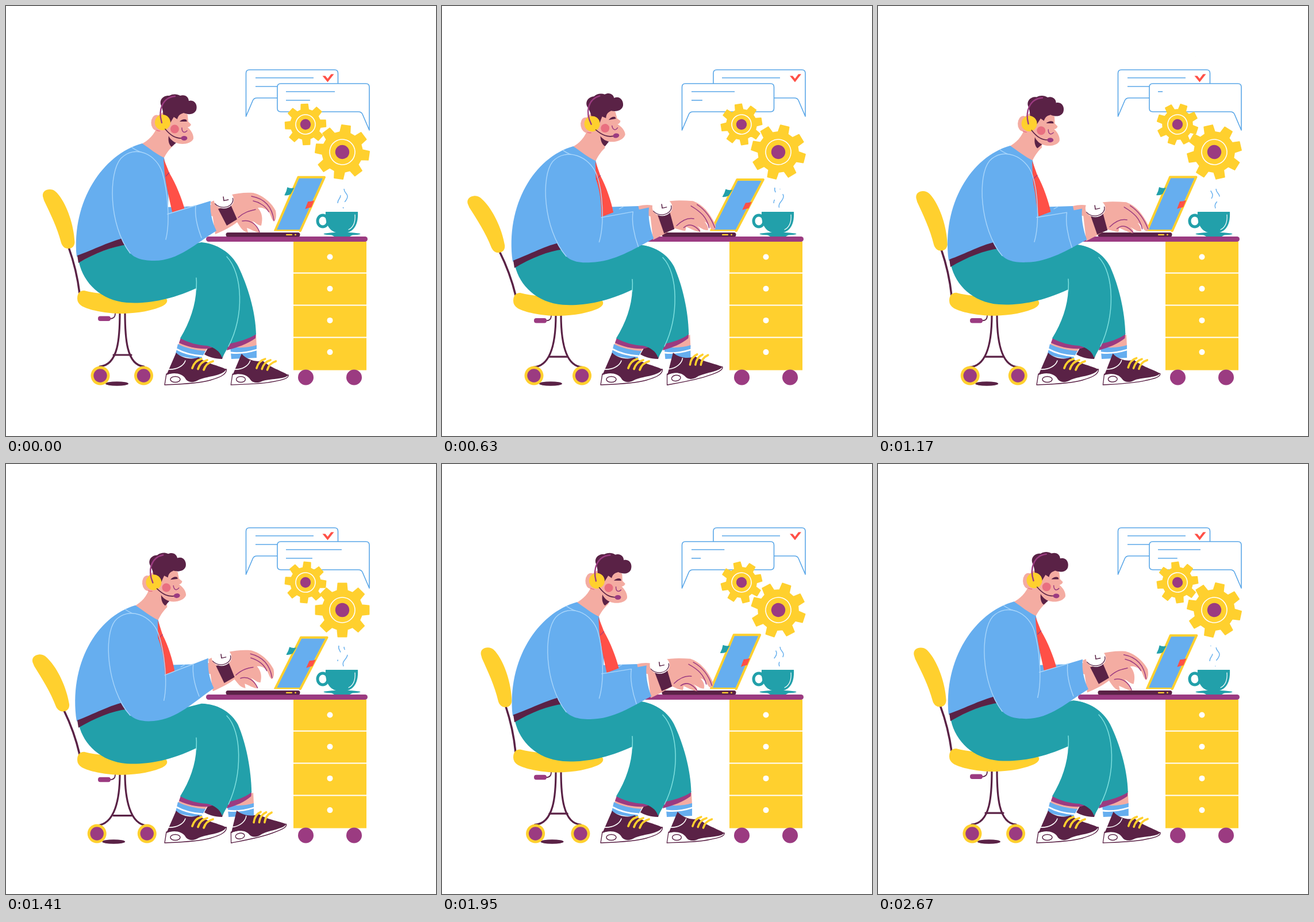
These frames come from a looping animation (748x748 px, 2.7 s). An HTML page with a canvas:

```html
<!DOCTYPE html>
<html lang="en">
<head>
<meta charset="utf-8">
<title>Office worker</title>
<style>
html, body { margin: 0; width: 100%; height: 100%; overflow: hidden; background: #fff; }
canvas { display: block; width: 748px; height: 748px; }
</style>
</head>
<body>
<canvas id="stage" width="748" height="748"></canvas>
<script>
const ctx = document.getElementById('stage').getContext('2d');
const LOOP = 2700, CYCLE = 900, STEP = 30;
const SKIN = '#f4aca2', DARK = '#5a2246', PURPLE = '#9b3b81', TEAL = '#22a0aa',
  YELLOW = '#ffd02e', RED = '#ff5047', BLUE = '#66aeef', PALE = '#a9d6fb', WHITE = '#fff';

const clamp = (v, lo = 0, hi = 1) => Math.min(hi, Math.max(lo, v));
const lerp = (a, b, k) => a + (b - a) * k;
const wave = (t, period) => (1 - Math.cos(2 * Math.PI * t / period)) / 2;
const backOut = x => 1 + 3 * (x - 1) ** 3 + 2 * (x - 1) ** 2;

// Smooth periodic curve through values at fixed phases of the cycle.
const PHASES = [0, 270, 450, 630, 750];
function cyclic(values, t) {
  const n = PHASES.length, p = t % CYCLE;
  const time = i => PHASES[(i + n) % n] + CYCLE * Math.floor(i / n);
  const val = i => values[(i + n) % n];
  const slope = i => (val(i + 1) - val(i - 1)) / (time(i + 1) - time(i - 1));
  let i = n - 1;
  while (PHASES[i] > p) i--;
  const d = time(i + 1) - time(i), x = (p - time(i)) / d;
  const s = x * x * (3 - 2 * x);
  return lerp(val(i), val(i + 1), s) +
    d * (slope(i) * x * (1 - x) ** 2 - slope(i + 1) * x * x * (1 - x));
}

const PAIR = /(-?[\d.]+) (-?[\d.]+)/g;
const warp = (d, fn) => d.replace(PAIR, (_, x, y) => fn(+x, +y).join(' '));
function morph(a, b, k) {
  const nums = b.match(/-?[\d.]+/g);
  let i = 0;
  return a.replace(/-?[\d.]+/g, v => lerp(+v, +nums[i++], k));
}
function fill(color, d) { ctx.fillStyle = color; ctx.fill(new Path2D(d)); }
function line(color, width, d) {
  ctx.strokeStyle = color; ctx.lineWidth = width; ctx.stroke(new Path2D(d));
}
function oval(color, x, y, rx, ry = rx) {
  ctx.fillStyle = color; ctx.beginPath();
  ctx.ellipse(x, y, rx, ry, 0, 0, 7); ctx.fill();
}
function ring(color, width, x, y, rx, ry = rx, from = 0, to = 2 * Math.PI) {
  ctx.strokeStyle = color; ctx.lineWidth = width; ctx.beginPath();
  ctx.ellipse(x, y, rx, ry, 0, from, to); ctx.stroke();
}
function pill(color, x, y, w, h, r) {
  ctx.fillStyle = color; ctx.beginPath(); ctx.roundRect(x, y, w, h, r); ctx.fill();
}
function group(draw, x, y, angle = 0, px = 0, py = 0, sx = 1, sy = sx) {
  ctx.save();
  ctx.translate(x + px, y + py);
  ctx.rotate(angle * Math.PI / 180);
  ctx.scale(sx, sy);
  ctx.translate(-px, -py);
  draw();
  ctx.restore();
}

// Messages: arrival, start of each typed line, start of the check mark.
const MESSAGES = [
  { at: 297, type: 427, type2: 560, check: 890, left: true },
  { at: 942, type: 1148, type2: 1240, check: 1575, left: false },
  { at: 1615, type: 1795, type2: 1890, check: 2220, left: true },
  { at: 2250, type: 2470, type2: 2545, check: 2900, left: false }
];
function message(k) {
  const n = MESSAGES.length, m = MESSAGES[(k + n) % n];
  return { ...m, shift: LOOP * Math.floor(k / n) };
}
const scrolled = (k, t) => {
  const m = message(k);
  return wave(clamp((t - m.at - m.shift + 115) / 220), 2);
};
function bubble(k, t) {
  const m = message(k), now = t - m.shift, next = message(k + 2);
  const age = now - m.at + 53, gone = clamp((t - next.at - next.shift - 2) / 250);
  if (age <= 0 || gone >= 1) return;
  const size = Math.max(0, backOut(clamp(age / 160))) * (1 - gone) ** 2;
  const top = 159 - 24 * (scrolled(k, t) + scrolled(k + 1, t) + scrolled(k + 2, t));
  const typed = (start, rate, max) => clamp((now - start) * rate, 0, max);
  group(() => {
    const outline = 'M-80 81 L-80 6 Q-80 0 -74 0 L74 0 Q80 0 80 6 L80 43 Q80 49 74 49 L-61 49 Q-66 49 -68 53 Z';
    const d = m.left ? outline : warp(outline, (x, y) => [-x, y]);
    fill(WHITE, d);
    ctx.lineCap = 'butt';
    line('#5aa7e8', 1.6, d);
    const x = m.left ? -63.5 : -65;
    const first = typed(m.type, .37, 101), second = typed(m.type2, .27, 68);
    if (first) line('#5aa7e8', 1.6, `M${x} 14 h${first}`);
    if (second) line('#5aa7e8', 1.6, `M${x} 29 h${second}`);
    const pop = clamp((now - m.check) / 100);
    if (pop) group(() => fill(RED, 'M-10 -4 L-5 -4 L-1 1 L5 -7 L10 -7 L-1 7 Z'), 63, 14.5, 0, 0, 0, pop);
  }, m.left ? 497.5 : 552, top, 0, 0, 0, size);
}

function gear(x, y, outer, root, hub, core, angle) {
  group(() => {
    ctx.fillStyle = YELLOW; ctx.strokeStyle = YELLOW;
    ctx.lineWidth = 2; ctx.lineJoin = 'round'; ctx.beginPath();
    for (let i = 0; i < 8; i++) {
      for (const [r, a] of [[root, -.25], [outer, -.16], [outer, .16], [root, .25]]) {
        const q = i * Math.PI / 4 + a;
        ctx.lineTo(r * Math.cos(q), r * Math.sin(q));
      }
    }
    ctx.closePath(); ctx.fill(); ctx.stroke();
    ring(WHITE, 1.6, 0, 0, hub);
    oval(PURPLE, 0, 0, core);
  }, x, y, angle);
}

function desk() {
  pill(PURPLE, 348, 401, 281, 9, 4.5);
  ctx.fillStyle = YELLOW; ctx.fillRect(500, 410, 127, 223.5);
  for (let i = 0; i < 4; i++) {
    if (i) { ctx.fillStyle = WHITE; ctx.fillRect(500, 407.5 + i * 56, 127, 2); }
    oval(WHITE, 563.5, 436.5 + i * 55.2, 5);
  }
  oval(PURPLE, 521.5, 646, 13.5);
  oval(PURPLE, 605.5, 646, 13.5);
}

function cup(t) {
  oval(TEAL, 584.5, 396.5, 32, 2.6);
  fill(TEAL, 'M566 398 L603 398 L598 401 L571 401 Z');
  ring(TEAL, 5, 551, 374, 9, 10);
  fill(TEAL, 'M556 358 L612 358 C613 376 608 390 594 394 L574 394 C560 390 555 376 556 358 Z');
  line(WHITE, 1.2, 'M607 363 C608 376 604 385 596 389');
  ctx.save();
  ctx.lineCap = 'butt';
  ctx.setLineDash([26, 10]);
  ctx.lineDashOffset = -(12 + 36 * t / CYCLE);
  line('#69b1ee', 1.5, 'M587 352 C583 342 594 340 594 331 C594 326 588 325 588 318');
  ctx.setLineDash([15, 14]);
  ctx.lineDashOffset = -29 * t / CYCLE;
  line('#69b1ee', 1.5, 'M577 343 C577 335 582 336 582 329 C582 324 577 323 579 316');
  ctx.restore();
}

function laptop(tilt) {
  const lean = (x, y) => {
    const w = tilt * (392 - y) / 96;
    return [x + 5.5 * w, y + 4.5 * w];
  };
  ctx.lineJoin = 'round';
  const screen = warp('M468 391 L508 297.5 L553.5 297.5 L512 391 Z', lean);
  fill(BLUE, screen);
  line(YELLOW, 4, screen);
  fill(TEAL, warp('M489 315 Q495 318 501 316 L495 327 Q490 330 484 329 Q488 322 489 315 Z', lean));
  fill(RED, warp('M525 340 Q530 340 536 338 L531 350 Q525 351 520 353 Z', lean));
  ctx.fillStyle = WHITE; ctx.fillRect(466, 391.5, 44, 3);
  pill(DARK, 382.5, 394, 129, 7.5, 3.5);
  pill(YELLOW, 487, 396.7, 11, 2.2, 1);
  oval(YELLOW, 503.5, 397.8, 1.4);
}

function chair(u, tilt) {
  const drop = 6 * u;
  group(() => {
    line(DARK, 3.5, 'M128 500 C125 475 118 445 109 420');
    fill(YELLOW, 'M64 331 C63 323 69 319 76 319 C84 319 88 324 92 329 C106 347 118 380 119.5 411 C119 419 114 422 108 422 C102 422 98 418 96 412 C89 385 77 361 66 338 Z');
  }, 0, drop, tilt, 128, 498);
  group(() => {
    line(DARK, 1.8, 'M181 544 Q190 544 190 535');
    pill(PURPLE, 160, 539.5, 22, 8.5, 4);
  }, 0, drop * .9);
  const foot = (x, y) => [x + (x < 202 ? -1 : 1) * drop * clamp((y - 590) / 35), y + drop * clamp((640 - y) / 40)];
  line(DARK, 3.2, warp('M198 533 C198 575 196 625 163 627 M207 533 C207 575 209 625 240 627', foot));
  line(DARK, 3.2, `M187 ${607 + drop * .8} h31`);
  oval(DARK, 193 - drop, 657, 20, 3.8);
  for (const x of [164 - drop, 239.5 + drop]) {
    oval(YELLOW, x, 643, 16.5);
    oval(PURPLE, x, 643, 11.7);
  }
  group(() => fill(YELLOW, 'M124 509 C124 499 129 495 136 495 C180 506 235 502 277 507 C284 513 279 519 270 523 C245 533 220 535 195 535 C170 534 145 529 132 522 Q124 517 124 509 Z'), 0, drop);
}

function shoe(flatten) {
  const lower = (x, y) => [x, y + flatten * clamp((x - 276) / 108) * clamp((660 - y) / 27)];
  const sole = warp('M279 640 L276 659 C300 658 335 657 355 651 C372 646 384 641 383.5 632 C360 630 310 634 279 640 Z', lower);
  fill(WHITE, sole);
  line(DARK, 1.4, sole);
  fill(DARK, warp('M296 603 C305 613 325 616 335 611 C348 622 372 626 383 632 C378 644 346 644 334 651 C326 656 316 655 312 648 C306 638 290 637 279 642 Z', lower));
  line(WHITE, 1.6, 'M282 632 C297 633 309 626 312 617');
  ring(DARK, 1.5, 294.5, 649.5, 8.5, 5);
  for (const x of [0, 10, 20]) {
    line(YELLOW, 3.8, `M${324 + x} ${630 + x / 7} Q${328 + x} ${617 + x / 5} ${340 + x} ${614 + x / 5}`);
  }
}

function legs(u, footTilt) {
  const bend = (x, y) => [
    x - 8 * u * clamp((x - 395) / 40) * clamp((y - 440) / 90),
    y + u * clamp((420 - x) / 160) * clamp((560 - y) / 50) * (6 + 6 * clamp((470 - y) / 60))
  ];
  group(() => {
    fill(SKIN, 'M387 584 L435 572 L436 593 L390 596 Z');
    fill(BLUE, 'M390 592 C405 596 422 594 436 590 L436 612 L392 614 Z');
    line(WHITE, 2.8, 'M391 603 C408 605 423 602 436 598');
  }, -5 * u, 0);
  group(() => group(() => shoe(10), 115, 0, 0, 280, 659, .93, 1), 0, 0, footTilt, 393, 657);
  fill(PURPLE, warp('M435 569 L434 578 C420 588 402 594 384 599 L386 585 Z', bend));
  fill(TEAL, warp('M345 412 C380 418 396 438 404 453 C420 486 434 530 435 571 C420 580 405 584 386 588 L370 520 Z', bend));

  fill(SKIN, 'M302 583 L352 593 L343 605 L298 595 Z');
  fill(BLUE, 'M299 588 C312 595 330 599 347 600 L340 613 C325 614 308 611 295 605 Z');
  line(WHITE, 2.8, 'M297 597 C311 605 327 608 342 609');
  shoe(0);
  fill(DARK, 'M354 590 L382 597 L376 614 C362 614 352 610 345 606 Z');
  fill(PURPLE, 'M304 577 C325 588 352 589 366 592 L352 596 C335 597 318 594 301 586 Z');
  fill(TEAL, warp('M127 446 C155 430 185 418 211 414 L250 430 L340 411 C370 414 388 430 396 445 C414 490 412 550 388 590 L376 612 C372 600 362 594 350 591 C333 590 318 586 303 578 C320 550 330 520 331 491 C280 514 240 518 210 516 C165 512 135 482 127 446 Z', bend));
  line('#80e0df', 1.5, warp('M384 436 C412 465 415 540 387 592', bend));
  line('#80e0df', 1.5, warp('M331 473 C332 482 331 488 331 494', bend));
}

function head() {
  oval(SKIN, 262, 203, 9.5, 13.5);
  line('#e8627b', 1.2, 'M262 216 Q268 219 274 216');
  fill(SKIN, 'M262 195 C270 178 300 178 316 189 L317 201 L322 206 Q321 210 316 211 C322 216 327 224 326 231 C322 240 306 242 296 238 C285 234 275 222 264 214 Z');
  fill(DARK, 'M272 200 C275 190 273 181 270 173 C266 164 273 155 284 156 C291 152 298 153 303 156 C312 153 318 159 318 165 C328 162 334 172 331 181 C327 190 316 189 309 186 C304 188 300 189 298 197 L292 193 L286 203 Z');
  fill(DARK, 'M283 226 C286 232 291 236 296 238 L288 245 C283 241 282 233 283 226 Z');
  oval(YELLOW, 272.5, 202.5, 13.5);
  line(PURPLE, 2.4, 'M271 203 C264 180 273 159 294 157');
  oval('#e96f80', 293.5, 214, 7.5);
  fill(DARK, 'M302 201 C306 197 311 196 314 198 L315 201 Z');
  line(PURPLE, 1.5, 'M306 212 C306 219 310 222 315 217');
  line(DARK, 1.6, 'M277 214 C287 226 295 230 305 230');
  oval(PURPLE, 310, 230, 5.5, 4);
}

function man(t) {
  const u = wave(t - 20, CYCLE), press = wave(t, CYCLE / 2);
  const handX = cyclic([0, 0, -7, 5, 1], t), handY = cyclic([0, 0, -4, -2, 0], t);
  const lean = (x, y) => {
    const w = clamp((430 - y) / 190, 0, 1.2);
    return [x - 12 * u * w, y + u * (12 - 5 * w)];
  };
  const hang = (x, y) => [x - u * (10 + 8 * clamp((y - 270) / 85)), y + 7 * u];
  const reach = (x, y) => {
    const k = clamp((x - 235) / 120), [lx, ly] = lean(x, y);
    const elbow = clamp((y - 400) / 40) * 6 * u;
    return [lerp(lx, x + handX, k), lerp(ly - elbow, y + handY, k)];
  };
  const arm = (a, b) => warp(morph(a, b, press), reach);

  group(() => {
    fill(BLUE, 'M275 350 L340 348 L352 360 L280 378 Z');
    fill(SKIN, 'M339 348 C350 345 364 345 372 350 L370 368 L342 362 Z');
    line(PALE, 1.3, 'M313 349 L306 353');
  }, handX * .5, 0);

  legs(u, cyclic([0, -1.5, -8.5, -8.5, -4], t));
  fill(SKIN, warp('M264 208 C258 224 248 234 234 241 L274 266 C278 258 283 250 292 242 L292 220 Z', lean));
  fill(BLUE, warp('M237 239 C168 258 114 340 123 436 L210 406 L258 430 L300 365 L282 350 C284 320 280 285 275 264 C262 258 250 248 237 239 Z', lean));
  fill(DARK, warp('M124 434 C150 425 185 407 209 403 L212 415 C185 418 155 430 126 447 Z', lean));
  line(PALE, 1.4, warp('M219 246 C226 251 233 254 241 256', lean));
  fill(RED, warp('M274 265 L284 290 C296 310 306 335 311 354 L290 362 C284 335 278 310 276 292 Z', hang));
  line(PURPLE, 1.2, warp('M278 296 L284 290', hang));
  group(head, -16 * u, 3.5 * u, cyclic([0, 1.7, -4, -10, -7], t), 272, 202);

  fill(SKIN, arm(
    'M356 341 C380 330 405 323 430 325 C448 329 464 345 469 356 C471 366 469 374 466 375 C461 371 461 362 456 357 C450 351 443 350 438 351 C446 360 447 370 444 382 C438 382 434 376 428 374 C434 380 440 388 441 394 C434 394 426 388 419 386 L421 394 C412 393 407 384 402 376 C392 384 380 390 364 397 Z',
    'M356 356 C380 339 405 341 432 343 C449 349 461 365 470 384 C473 390 470 394 466 393 C463 392 461 389 459 386 C457 383 455 381 453 380 C458 385 460 390 459 393 C452 394 446 389 440 386 C444 389 446 392 444 395 C436 394 428 390 420 386 L418 393 C410 392 405 390 398 390 C390 395 378 402 362 410 Z'));
  [['M427 331 C450 335 463 350 466 373', 'M440 349 C455 360 464 375 470 389'],
   ['M430 339 C440 341 452 348 457 358', 'M428 351 C446 362 456 372 460 391'],
   ['M404 368 C415 358 425 356 434 354', 'M403 386 C415 374 425 372 433 374'],
   ['M411 374 C425 371 436 380 441 393', 'M416 389 C426 379 436 385 444 394']
  ].forEach(([a, b]) => line(PURPLE, 1.5, arm(a, b)));

  fill(BLUE, arm(
    'M216 430 C190 400 176 330 190 290 C200 262 225 245 245 258 C272 280 281 320 281 362 L356 339 C354 355 358 375 366 391 C330 413 300 443 258 443 C235 443 224 438 216 430 Z',
    'M216 430 C190 400 176 330 190 290 C200 262 225 245 245 258 C272 280 279 320 277 364 L355 354 C353 370 357 392 363 408 C330 424 298 443 258 443 C235 443 224 438 216 430 Z'));
  line(PALE, 1.4, arm(
    'M216 430 C178 380 178 290 200 265 C225 240 262 258 272 290 C281 320 286 375 278 406',
    'M216 430 C178 380 178 290 200 265 C225 240 262 258 272 290 C281 320 282 375 272 406'));
  line(PALE, 1.4, arm('M281 362 L330 347 C328 365 333 385 340 403', 'M277 364 L329 359 C326 375 330 400 337 421'));

  fill(DARK, arm('M369 353 L391 346 L402 371 L384 382 Z', 'M370 366 L391 361 L399 392 L381 399 Z'));
  group(() => {
    oval(WHITE, 0, 0, 18);
    ring(DARK, 1.4, -1, 0, 17.5, 15.5, -.2, 2.6);
    line(DARK, 1.6, 'M-1 -6 L0 2 L8 0');
  }, lerp(379, 378, press) + handX, lerp(337, 353.5, press) + handY, 0, 0, 0, .96, .85);
}

function draw(t) {
  ctx.setTransform(1, 0, 0, 1, 0, 0);
  ctx.fillStyle = WHITE;
  ctx.fillRect(0, 0, 748, 748);
  ctx.lineCap = ctx.lineJoin = 'round';
  for (let k = -3; k < 4; k++) bubble(k, t);
  const turn = 360 * t / LOOP;
  gear(521, 206, 35.5, 26, 17, 9.2, -93 + turn);
  gear(585, 254, 47, 35, 22, 12.2, -82 - turn);
  desk();
  cup(t);
  laptop(cyclic([.08, 0, .8, 1, .6], t));
  chair(wave(t - 5, CYCLE), cyclic([0, .8, -5.2, -6.8, -4.2], t));
  man(t);
}

function frame(now) {
  draw(Math.floor((now % LOOP) / STEP) * STEP);
  requestAnimationFrame(frame);
}
draw(0);
requestAnimationFrame(frame);
</script>
</body>
</html>
```
